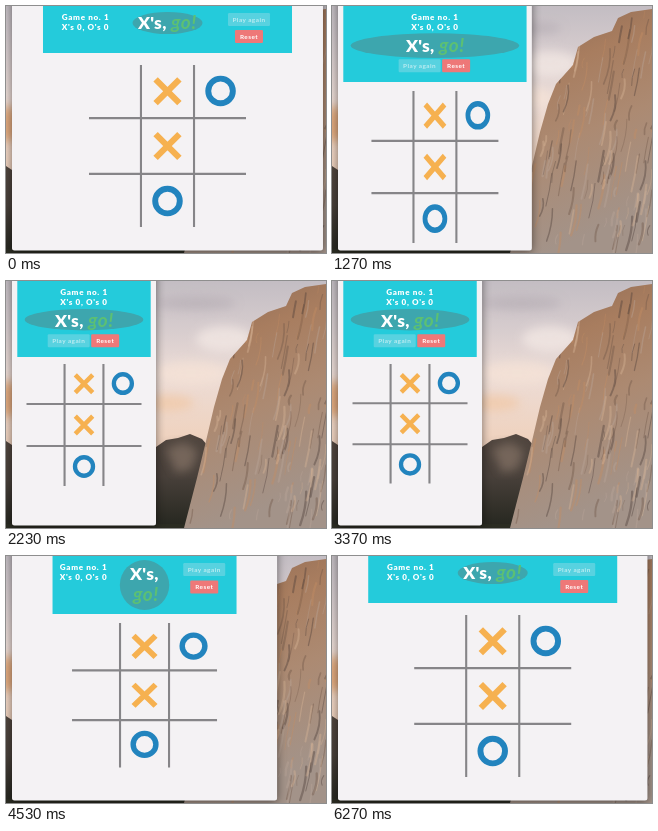
An HTML page that plays this animation: 320 px wide and 247 px high, repeating every 6.31 s.

```html
<!DOCTYPE html>
<html lang="en">
<head>
<meta charset="utf-8">
<title>Responsive noughts and crosses</title>
<style>
  html, body { margin: 0; width: 100%; height: 100%; overflow: hidden; }
  svg { display: block; width: 100vw; height: 100vh; }
  text { font-family: Lato, "Open Sans", sans-serif; font-weight: 900; fill: #fff; }
  .info { font-size: 8.1px; letter-spacing: .65px; text-anchor: middle; }
  .turn { font-size: 17.4px; letter-spacing: .3px; }
  .go { font-size: 19px; font-weight: 700; font-style: italic; letter-spacing: .5px; fill: #5cc073; }
  .label { font-size: 6.4px; font-weight: 700; letter-spacing: .45px; text-anchor: middle; }
  .grid { stroke: #868588; stroke-width: 2.1; fill: none; }
  .cross { stroke: #f6b150; stroke-width: 6.2; fill: none; }
  .ring { stroke: #2284be; stroke-width: 5.9; fill: none; }
</style>
</head>
<body>
<svg viewBox="0 0 320 247" preserveAspectRatio="none">
  <defs>
    <linearGradient id="sky" x1="0" y1="0" x2="0" y2="1">
      <stop offset="0" stop-color="#c3bdc3"/>
      <stop offset=".18" stop-color="#d5cbcd"/>
      <stop offset=".38" stop-color="#ecdcd6"/>
      <stop offset=".62" stop-color="#efd3c0"/>
      <stop offset="1" stop-color="#c9a893"/>
    </linearGradient>
    <linearGradient id="rock" x1="0" y1="0" x2=".25" y2="1">
      <stop offset="0" stop-color="#8d6a54"/>
      <stop offset=".3" stop-color="#a87d5f"/>
      <stop offset=".6" stop-color="#ac8a72"/>
      <stop offset="1" stop-color="#a39389"/>
    </linearGradient>
    <linearGradient id="hill" x1="0" y1="0" x2="0" y2="1">
      <stop offset="0" stop-color="#51463f"/>
      <stop offset=".45" stop-color="#48403a"/>
      <stop offset="1" stop-color="#25261f"/>
    </linearGradient>
    <filter id="soft" x="-20%" y="-20%" width="140%" height="140%"><feGaussianBlur stdDeviation="5"/></filter>
    <clipPath id="face"><path id="cliffEdge" d="M320 3L299 6 286 12 280 25 262 31 246 41 241 59 224 78 216 98 208 126 200 160 191 197 178 247H320Z"/></clipPath>
  </defs>

  <rect width="320" height="247" fill="url(#sky)"/>
  <g filter="url(#soft)" opacity=".75">
    <ellipse cx="218" cy="58" rx="28" ry="13" fill="#f3e8e4"/>
    <ellipse cx="185" cy="92" rx="36" ry="12" fill="#f5e2d6"/>
    <ellipse cx="162" cy="122" rx="26" ry="8" fill="#f1c9a8"/>
    <ellipse cx="190" cy="22" rx="40" ry="7" fill="#b9b1b7"/>
    <ellipse cx="2" cy="118" rx="12" ry="18" fill="#dd9a63"/>
  </g>
  <path d="M0 160L6 164V247H0Z" fill="url(#hill)"/>
  <path d="M140 170L150 166 160 159 172 157 184 153 196 158 202 165V247H140Z" fill="url(#hill)"/>
  <path d="M160 168L178 161 192 170 186 188 170 192Z" fill="#75655a" filter="url(#soft)"/>
  <use href="#cliffEdge" fill="url(#rock)"/>
  <g id="cracks" clip-path="url(#face)" fill="none" stroke-linecap="round"></g>
  <path d="M0 243H178V247H0Z" fill="#2b2c22"/>

  <rect id="shadow" x="6" y="-20" height="266" rx="3" fill="#000" opacity=".5" filter="url(#soft)"/>
  <rect id="page" x="6" y="-20" height="264.5" rx="2.5" fill="#f4f2f4"/>
  <rect id="header" y="-5" fill="#24cbdb"/>

  <g id="middle">
    <g id="info">
      <text class="info" y="14.3">Game no. 1</text>
      <text class="info" y="23.5">X's 0, O's 0</text>
    </g>
    <ellipse id="badge" fill="#3da6ae"/>
    <text class="turn" id="turn">X's,</text>
    <text class="turn go" id="go">go!</text>
    <g id="again">
      <rect x="-21" y="-6.5" width="42" height="13" rx="1.2" fill="#58d2e0"/>
      <text class="label" y="2.2" style="fill:#bdecf1">Play again</text>
    </g>
    <g id="reset">
      <rect x="-14" y="-6.5" width="28" height="13" rx="1.2" fill="#ee7878"/>
      <text class="label" y="2.2">Reset</text>
    </g>
    <path class="grid" id="grid"/>
    <g id="marks"></g>
  </g>
</svg>
<script>
const LOOP = 6310, LEFT = 6;
const el = id => document.getElementById(id);
const mix = (a, b, k) => a + (b - a) * k;

function set(id, attrs) {
  for (const name in attrs) el(id).setAttribute(name, attrs[name]);
}
function move(id, x, y) {
  set(id, { transform: `translate(${x} ${y})` });
}
function add(parent, tag, attrs) {
  const node = document.createElementNS("http://www.w3.org/2000/svg", tag);
  for (const name in attrs) node.setAttribute(name, attrs[name]);
  return el(parent).appendChild(node);
}

// time, window width, board height (which trails the width)
const steps = [
  [0, 311, 162], [300, 306, 162], [830, 258, 161], [1270, 194, 152],
  [1500, 163, 142], [1750, 144, 132], [2230, 144, 122], [2500, 144, 119.5],
  [3370, 144, 119.5], [3600, 152, 121], [4150, 222, 136], [4530, 265, 144.5],
  [4900, 290, 155], [5400, 308, 162], [6270, 309.4, 162], [6310, 311, 162]
];

function sample(t) {
  const i = steps.findIndex(s => s[0] > t);
  const a = steps[i - 1], b = steps[i];
  const k = (t - a[0]) / (b[0] - a[0]);
  return [mix(a[1], b[1], k), mix(a[2], b[2], k)];
}

// Positions are relative to the window's centre line.
function layout(width) {
  if (width >= 272) return {
    head: 249, bottom: 47, info: -82, badge: [0, 17, 35, 11],
    turn: [-29.5, 23], go: [3.5, 23], again: [81.5, 13.5], reset: [81.5, 30.5],
    board: 157, top: 59
  };
  if (width >= 198) return {
    head: 184, bottom: 58, info: -61, badge: [0, 29, 24.7, 25],
    turn: [-14.5, 24], go: [-11.5, 45], again: [59.7, 13.5], reset: [59.7, 31],
    board: 145, top: 67
  };
  const k = (width - 144) / 50;
  return {
    head: width - 10.6, bottom: 76, info: 0,
    badge: [0, mix(38.7, 39.6, k), width / 2 - 12.7, mix(10.7, 12.3, k)],
    turn: [-29, 45.5], go: [4, 45.5], again: [-15.3, 59.7], reset: [21.2, 59.7],
    board: mix(115, 127, k), top: mix(83, 85, k)
  };
}

// kind, column offset, vertical share of the board
const marks = [["cross", 0, .162], ["ring", 1, .16], ["cross", 0, .5], ["ring", 0, .84]]
  .map(([kind, col, row]) => ({
    col, row,
    node: add("marks", "path", {
      class: kind,
      d: kind === "cross" ? "M-11.9-11.9L11.9 11.9M11.9-11.9L-11.9 11.9"
                          : "M-12.3 0A12.3 12.3 0 1 1 12.3 0A12.3 12.3 0 1 1-12.3 0Z"
    })
  }));

function draw(t) {
  const [width, high] = sample(t);
  const p = layout(width), mid = LEFT + width / 2;
  set("page", { width });
  set("shadow", { width });
  set("header", { x: mid - p.head / 2, width: p.head, height: p.bottom + 5 });
  move("middle", mid, 0);
  move("info", p.info, 0);
  const [cx, cy, rx, ry] = p.badge;
  set("badge", { cx, cy, rx, ry });
  for (const id of ["turn", "go", "again", "reset"]) move(id, ...p[id]);

  const half = p.board / 2, col = p.board * .169;
  const y1 = p.top + high * .328, y2 = p.top + high * .672;
  set("grid", {
    d: `M${-col} ${p.top}v${high}M${col} ${p.top}v${high}` +
       `M${-half} ${y1}h${p.board}M${-half} ${y2}h${p.board}`
  });
  for (const m of marks) {
    const x = m.col * col * 2, y = p.top + m.row * high;
    m.node.setAttribute("transform",
      `translate(${x} ${y}) scale(${p.board / 157} ${high / 162})`);
  }
}

// Soft streaks down the rock face
let seed = 7;
const rand = () => (seed = seed * 16807 % 2147483647) / 2147483647;
const tones = ["#4b3d38", "#d6b596", "#6f5648", "#c48d62", "#b9a598"];
for (let i = 0; i < 170; i++) {
  const x = 185 + rand() * 140, y = rand() * 230, len = 8 + rand() * 28;
  add("cracks", "path", {
    d: `M${x} ${y}q${rand() * 6 - 4} ${len / 2} ${-len * .18} ${len}`,
    stroke: tones[i % tones.length], "stroke-width": .6 + rand() * 1.8, opacity: .4
  });
}

const start = performance.now();
function tick() {
  draw((performance.now() - start) % LOOP);
  requestAnimationFrame(tick);
}
tick();
</script>
</body>
</html>
```
